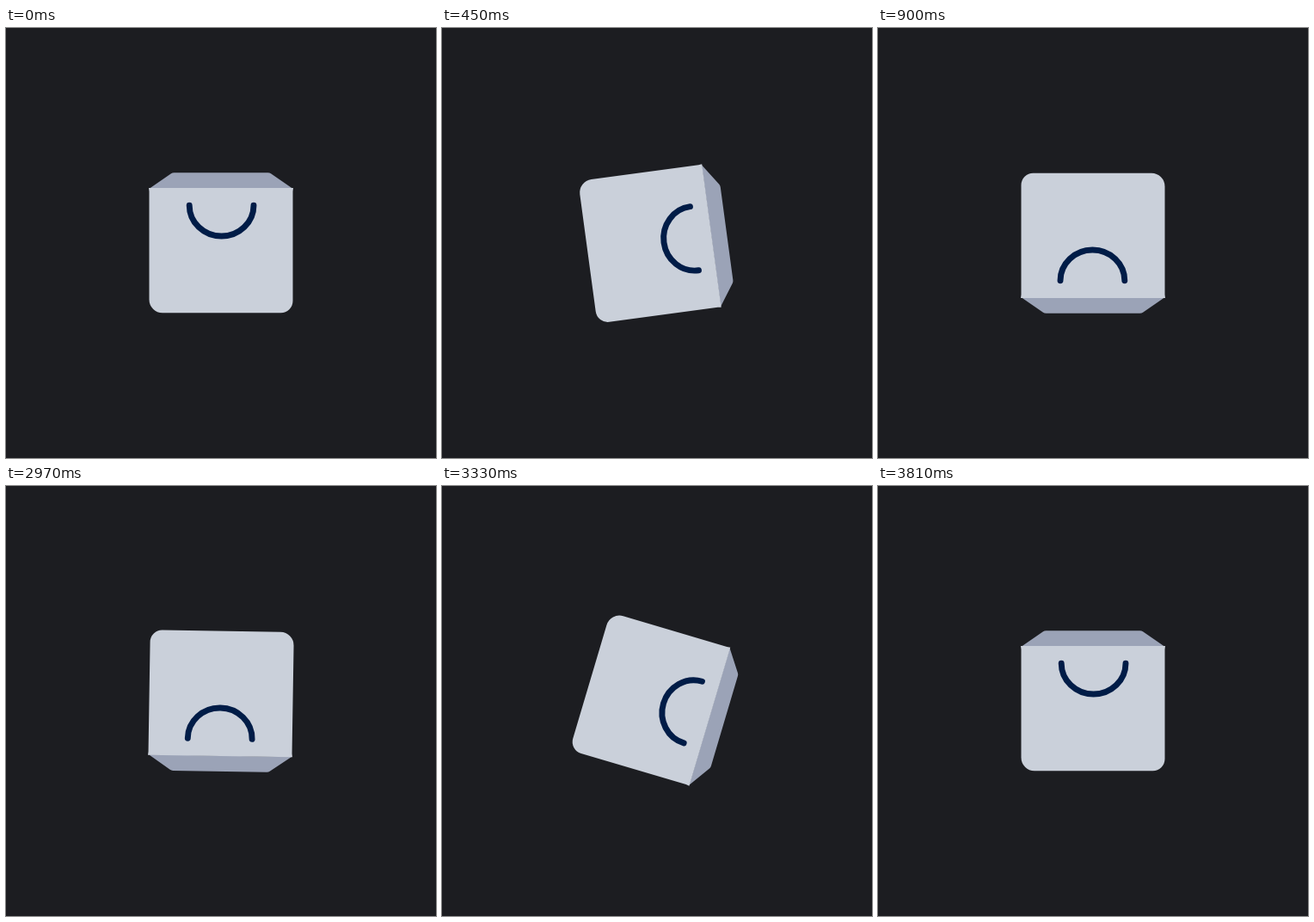
An HTML page with a canvas for the animation above (4530 ms loop, 500 by 500 pixels).

```html
<!DOCTYPE html>
<html lang="en">
<head>
<meta charset="utf-8">
<title>Tumbling bag</title>
<style>
  html, body { margin: 0; width: 100%; height: 100%; overflow: hidden; background: #1c1d21; }
  canvas { display: block; width: 500px; height: 500px; }
</style>
</head>
<body>
<canvas id="stage" width="500" height="500"></canvas>
<script>
const ctx = document.getElementById('stage').getContext('2d');
const LOOP = 4530, STEP = 30, TURN = 852;
const FLIP_AT = 42, RETURN_AT = 2941;

const bezier = (s, p, q) =>
  3 * (1 - s) * (1 - s) * s * p + 3 * (1 - s) * s * s * q + s * s * s;

// cubic-bezier(.5, -.1, .55, 1): a slight wind-up, then a soft landing
function ease(t) {
  if (t <= 0) return 0;
  if (t >= 1) return 1;
  let lo = 0, hi = 1;
  for (let i = 0; i < 30; i++) {
    const mid = (lo + hi) / 2;
    if (bezier(mid, 0.5, 0.45) < t) lo = mid; else hi = mid;
  }
  return bezier(lo, -0.1, 1);
}

const angleAt = t => Math.PI * (ease((t - FLIP_AT) / TURN) - ease((t - RETURN_AT) / TURN));

function drawBag() {
  // lid
  ctx.fillStyle = '#9ba3b7';
  ctx.beginPath();
  ctx.moveTo(-83, -63.6);
  ctx.lineTo(-58, -80.8);
  ctx.quadraticCurveTo(-56.6, -81.8, -54.5, -81.8);
  ctx.lineTo(54.5, -81.8);
  ctx.quadraticCurveTo(56.6, -81.8, 58, -80.8);
  ctx.lineTo(83, -63.6);
  ctx.fill();

  // front
  ctx.fillStyle = '#cad0da';
  ctx.beginPath();
  ctx.moveTo(-84, -64);
  ctx.lineTo(84, -64);
  ctx.lineTo(83.5, -60);
  ctx.arcTo(83.5, 81.3, 0, 81.3, 14);
  ctx.arcTo(-83.5, 81.3, -83.5, 0, 15.5);
  ctx.lineTo(-83.5, -60);
  ctx.fill();

  // handle
  ctx.strokeStyle = '#001c47';
  ctx.lineWidth = 6.9;
  ctx.lineCap = 'round';
  ctx.beginPath();
  ctx.ellipse(0.6, -43.8, 37.4, 35.8, 0, 0, Math.PI);
  ctx.stroke();
}

function render(t) {
  ctx.setTransform(1, 0, 0, 1, 0, 0);
  ctx.fillStyle = '#1c1d21';
  ctx.fillRect(0, 0, 500, 500);
  ctx.translate(250, 250);
  ctx.rotate(angleAt(t));
  drawBag();
}

const start = performance.now();
function tick() {
  const t = performance.now() - start;
  // small lead keeps the steps on their marks
  render(Math.floor((t + 6) / STEP) * STEP % LOOP);
  requestAnimationFrame(tick);
}
tick();
</script>
</body>
</html>
```
